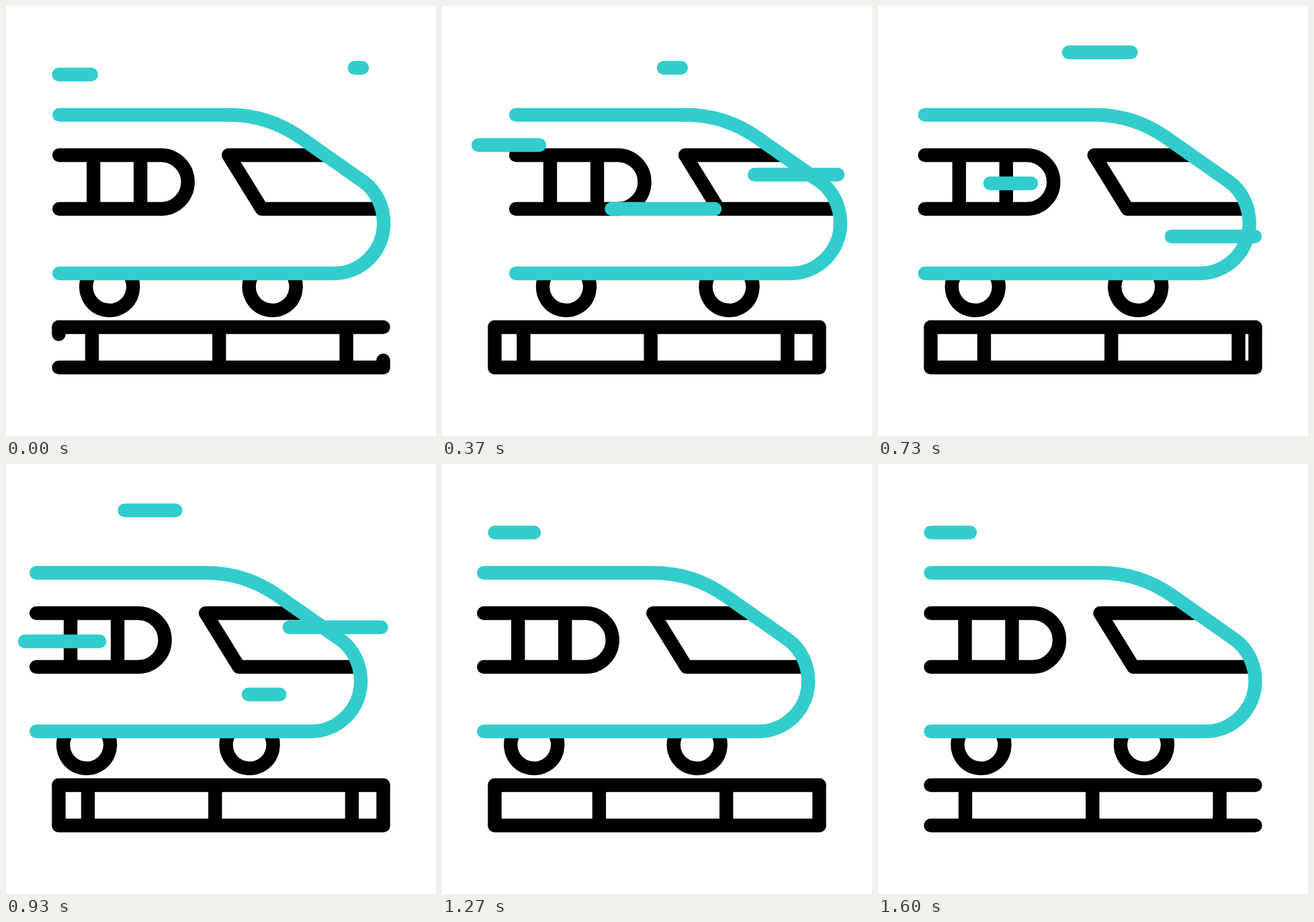
Recreate the animation shown at these times as an HTML page with a canvas. Size 640 px wide and 640 px high, loop 1670 ms.

```html
<!DOCTYPE html>
<html lang="en">
<head>
<meta charset="utf-8">
<title>Train</title>
<style>
html, body { margin: 0; width: 100%; height: 100%; overflow: hidden; background: #fff; }
canvas { display: block; width: 100vw; height: 100vh; }
</style>
</head>
<body>
<canvas id="stage" width="640" height="640"></canvas>
<script>
const ctx = document.getElementById('stage').getContext('2d');
const LOOP = 1670, LAST_STEP = 48;
const TEAL = '#33cccc', BLACK = '#000';
const LEFT = 78.5, RIGHT = 561.5, RAIL_TOP = 478, RAIL_BOTTOM = 538;

// Speed lines run from right to left: lead and tail are the steps at which each end sets off.
const dashes = [
  { y: 102, right: 137, length: 58.5, lead: -20, tail: -0.2, span: 4.5 },
  { y: 92, right: 530, lead: -0.15, tail: 5.8 },
  { y: 207, right: 254, lead: 2.2, tail: 7.76 },
  { y: 302, right: 406, lead: 6.5, tail: 12 },
  { y: 251, right: 589, lead: 7.36, tail: 12.9 },
  { y: 343, right: 561, lead: 18.35, tail: 23.5 },
  { y: 69, right: 376.5, lead: 19.2, tail: 24.35 },
  { y: 264, right: 228, lead: 20.06, tail: 25.3 },
  { y: 243, right: 558.5, lead: 24, tail: 29.8 },
  { y: 102, right: 137, length: 58.5, lead: 30.4, tail: 99 }
];

// Pace of the sleepers: [step, share of the run]
const pace = [[-0.12, 0], [12, 0.262], [23, 0.484], [29, 0.615], [35, 0.727], [44, 0.927], [47.3, 1]];

const smooth = u => u * u * (3 - 2 * u);
const ramp = (k, start, span) => smooth(Math.min(1, Math.max(0, (k - start) / span)));

function paceAt(k) {
  const i = pace.findIndex(p => p[0] > k);
  if (i < 0) return 1;
  const [k0, u0] = pace[i - 1], [k1, u1] = pace[i];
  return u0 + (u1 - u0) * (k - k0) / (k1 - k0);
}

function stroke(path, color, cap = 'round') {
  ctx.strokeStyle = color;
  ctx.lineCap = cap;
  ctx.stroke(path);
}

function line(x0, y0, x1, y1, color = BLACK, cap = 'round') {
  const path = new Path2D();
  path.moveTo(x0, y0);
  path.lineTo(x1, y1);
  stroke(path, color, cap);
}

const body = new Path2D('M78.5 162H331C369.5 162 406.5 174 438 196L532 262C550.5 275.5 561.5 299 561.5 323.5A74.5 74.5 0 0 1 487 398H78.5');
const rearWindow = new Path2D('M78.5 222H230A40 40 0 0 1 230 302H78.5');
const frontWindow = new Path2D('M475 222H330.5L380 302H553');

function drawTrack(k) {
  const spacing = 189.3, cycle = 582.2;
  const shift = 2 * cycle * smooth(paceAt(k));
  ctx.save();
  ctx.beginPath();
  ctx.rect(LEFT, 460, RIGHT - LEFT, 100);
  ctx.clip();
  for (let group = 0; group < 4; group++) {
    for (let i = 0; i < 3; i++) {
      const x = 130 + group * cycle + i * spacing - shift;
      line(x, RAIL_TOP, x, RAIL_BOTTOM, BLACK, 'butt');
    }
  }
  ctx.restore();

  line(LEFT, RAIL_TOP, RIGHT, RAIL_TOP);
  line(LEFT, RAIL_BOTTOM, RIGHT, RAIL_BOTTOM);

  const grow = 60 * ramp(k, -0.2, 4.5), shrink = 60 * ramp(k, 42.15, 4.5);
  if (grow > shrink) {
    line(LEFT, RAIL_TOP + shrink, LEFT, RAIL_TOP + grow);
    line(RIGHT, RAIL_BOTTOM - shrink, RIGHT, RAIL_BOTTOM - grow);
  }
}

function drawTrain(k) {
  const sway = 33.3 * ramp(k, -0.2, 14.2) - 66.8 * ramp(k, 14, 15.33) + 33.5 * ramp(k, 29.33, 19);
  ctx.save();
  ctx.translate(sway, 0);
  for (const x of [153.5, 396]) {
    const wheel = new Path2D();
    wheel.arc(x, 418, 35, -0.55, Math.PI + 0.55);
    stroke(wheel, BLACK, 'butt');
  }
  stroke(rearWindow, BLACK);
  for (const x of [129.5, 199.5]) line(x, 222, x, 302, BLACK, 'butt');
  stroke(frontWindow, BLACK, 'butt');
  stroke(body, TEAL);
  ctx.restore();
}

function drawDashes(k) {
  for (const { y, right, length = 200, lead, tail, span = 8 } of dashes) {
    const head = ramp(k, lead, span), end = ramp(k, tail, span);
    if (head > end) line(right - length * head, y, right - length * end, y, TEAL);
  }
}

function draw(time) {
  // Thirty steps a second; the last one is held.
  const step = Math.min(LAST_STEP, Math.floor((time % LOOP + 3.4) * 0.03));
  const k = step + 1;
  ctx.fillStyle = '#fff';
  ctx.fillRect(0, 0, 640, 640);
  ctx.lineWidth = 20.4;
  ctx.lineJoin = 'round';
  drawTrack(k);
  drawTrain(k);
  drawDashes(k);
}

let start;
function tick(now) {
  start ??= now;
  draw(Math.max(0, now - start));
  requestAnimationFrame(tick);
}
draw(0);
requestAnimationFrame(tick);
</script>
</body>
</html>
```
